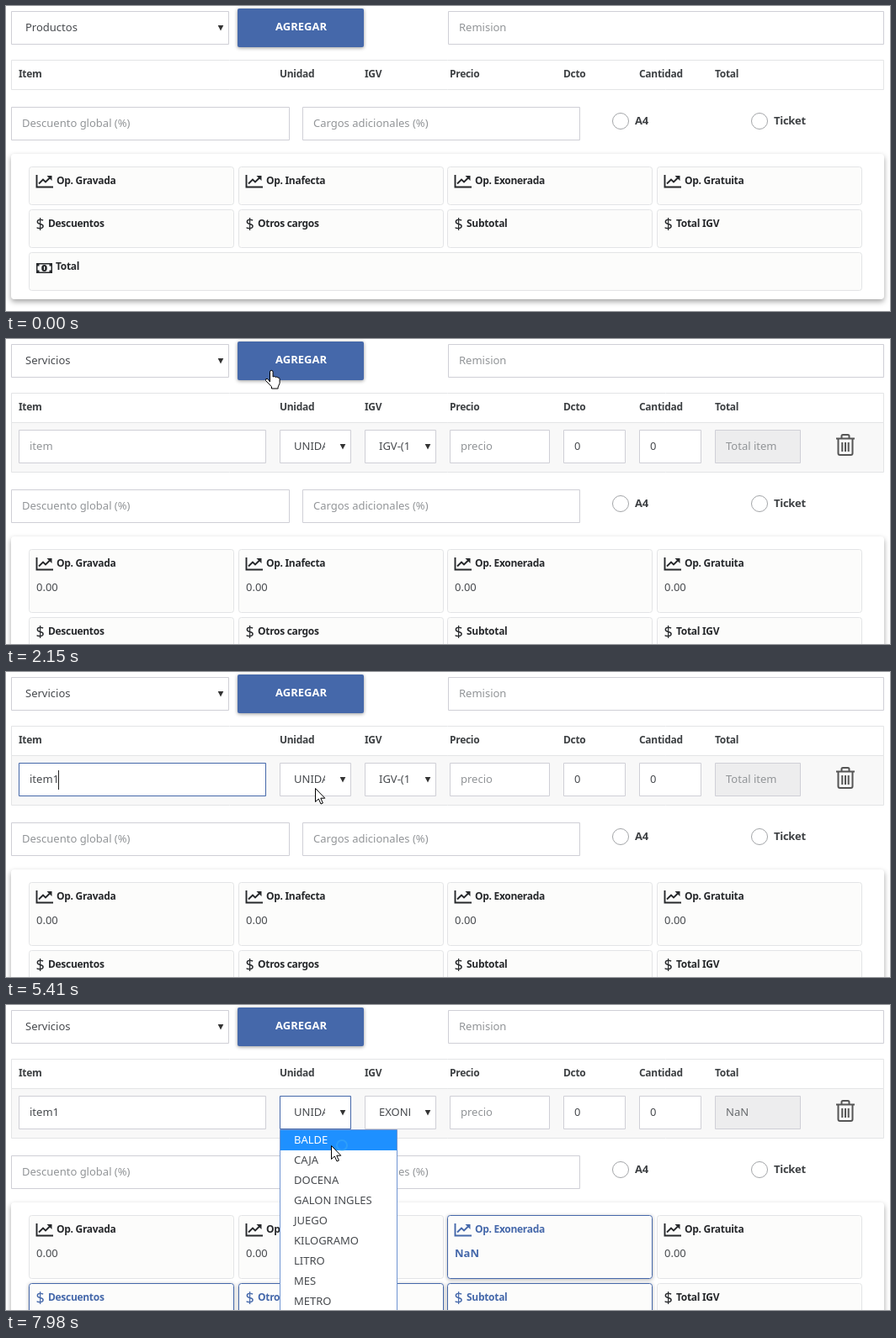
An HTML page with a canvas that plays this animation: 1050 px wide and 363 px high, repeating every 8000 ms.

```html
<!DOCTYPE html>
<html lang="es">
<head>
<meta charset="utf-8">
<style>
  html, body { margin: 0; width: 100%; height: 100%; overflow: hidden; background: #fff; }
  canvas { display: block; }
</style>
</head>
<body>
<canvas id="stage" width="1050" height="363"></canvas>
<script>
const ctx = document.getElementById('stage').getContext('2d');
const LOOP = 8000, STEP = 77;
const BLUE = '#4568aa', DARK = '#26282b', INK = '#474a4e', HINT = '#929598', EDGE = '#cfcfd6', LINE = '#e3e4e6';

// Pointer moves: start time, number of steps, destination
const START = [688, 250];
const MOVES = [
  [150, 5, 127, 22], [850, 5, 108, 84], [1620, 4, 313, 37], [2320, 4, 145, 134],
  [5030, 8, 500, 141], [5800, 1, 498, 136], [6180, 1, 491, 165], [6260, 3, 490, 183],
  [6810, 3, 387, 135], [7040, 2, 384, 126], [7590, 6, 386, 167]
];
// Moment at which each letter is typed
const KEYS = [[3550, 'i'], [3720, 't'], [3870, 'e'], [3950, 'm'], [4330, '1']];

const ARROW = new Path2D('M.5 .5V16.5L4.3 13 7 19 9.4 18 6.8 12.2H11.8Z');
const HAND = new Path2D('M.5 14V2.2a1.8 1.8 0 0 1 3.6 0V8q1.7-1.2 3.2.4 1.6-.8 2.8.7 2-.4 2 1.6v5l-2 4.5V22H2.5v-2.2L-4.5 12.5q-.5-3 2.3-2z');
const BEAM = new Path2D('M-2.5-7.5h6M.5-7.5v16M-2.5 8.5h6');
const TRASH = new Path2D('M986 118.5h22M992.5 118v-2.5q0-1.5 1.5-1.5h6q1.5 0 1.5 1.5v2.5M988.5 119v17q0 2 2 2h13q2 0 2-2v-17M993.3 123v11M997 123v11M1000.7 123v11');
const CHART = new Path2D('M.5 0V14.5H20M3 10.5 8 5.5 11 8.5 16 3.5');
const CHART_TIP = new Path2D('M12.5 1H18.5V7Z');

const between = (t, a, b) => t >= a && t < b;

function text(s, x, y, color = INK, weight = 400, size = 13, spacing = 0) {
  ctx.font = `${weight} ${size}px "Noto Sans", sans-serif`;
  ctx.letterSpacing = spacing + 'px';
  ctx.fillStyle = color;
  ctx.fillText(s, x, y);
}
const label = (s, x, y, color = DARK) => text(s, x, y, color, 600, 12, -0.3);

function box(x, y, w, h, edge = EDGE, fill = '#fff', radius = 0) {
  ctx.beginPath();
  ctx.roundRect(x + .5, y + .5, w - 1, h - 1, radius);
  ctx.fillStyle = fill;
  ctx.fill();
  ctx.strokeStyle = edge;
  ctx.lineWidth = 1;
  ctx.stroke();
}

function raised(x, y, w, h, fill, radius, offset, blur, shade) {
  ctx.save();
  ctx.shadowColor = `rgba(0,0,0,${shade})`;
  ctx.shadowOffsetY = offset;
  ctx.shadowBlur = blur;
  ctx.fillStyle = fill;
  ctx.beginPath();
  ctx.roundRect(x, y, w, h, radius);
  ctx.fill();
  ctx.restore();
}

function field(s, x, y, w, focused, color = HINT) {
  box(x, y, w, 40, focused ? BLUE : EDGE);
  text(s, x + 13, y + 24, color);
}

function select(s, x, y, w, focused) {
  box(x, y, w, 40, focused ? BLUE : EDGE);
  ctx.save();
  ctx.beginPath();
  ctx.rect(x, y, w - 31, 40);
  ctx.clip();
  text(s, x + 17, y + 24);
  ctx.restore();
  const ax = x + w - 10, ay = y + 17;
  ctx.fillStyle = '#333';
  ctx.beginPath();
  ctx.moveTo(ax - 3.3, ay);
  ctx.lineTo(ax + 3.3, ay);
  ctx.lineTo(ax, ay + 6.5);
  ctx.fill();
}

function dropdown(options, x, y, w, active) {
  box(x, y, w, options.length * 24 + 2, '#6f94d2');
  options.forEach((s, i) => {
    const top = y + 1 + i * 24;
    if (i === active) {
      ctx.fillStyle = '#1e90ff';
      ctx.fillRect(x + 1, top, w - 2, 24);
    }
    text(s, x + 17, top + 15.5, i === active ? '#fff' : INK, i === active ? 500 : 400);
  });
}

function radio(s, x, y) {
  ctx.beginPath();
  ctx.arc(x, y, 9.5, 0, 7);
  ctx.strokeStyle = '#a3a5a8';
  ctx.lineWidth = 1;
  ctx.stroke();
  text(s, x + 17, y + 4, '#3d4043', 600, 13, -0.3);
}

function chartIcon(x, y, color) {
  ctx.save();
  ctx.translate(x, y);
  ctx.strokeStyle = ctx.fillStyle = color;
  ctx.lineWidth = 1.9;
  ctx.stroke(CHART);
  ctx.fill(CHART_TIP);
  ctx.restore();
}

function noteIcon(x, y) {
  ctx.fillStyle = DARK;
  ctx.fillRect(x, y, 19, 12);
  ctx.fillStyle = '#fcfcfb';
  ctx.fillRect(x + 3.5, y + 1.5, 12, 9);
  ctx.fillRect(x + 1.5, y + 3.5, 16, 5);
  ctx.fillStyle = DARK;
  ctx.beginPath();
  ctx.ellipse(x + 9.5, y + 6, 3.3, 4, 0, 0, 7);
  ctx.fill();
  ctx.fillStyle = '#fff';
  ctx.fillRect(x + 9, y + 4, 1.2, 4);
}

function card(title, x, y, w, h, value, lit, icon) {
  const color = lit ? BLUE : DARK;
  if (lit) raised(x, y, w, h, '#fff', 3, 1, 4, .3);
  box(x, y, w, h, lit ? BLUE : LINE, '#fcfcfb', 3);
  if (icon === 'chart') {
    chartIcon(x + 9, y + 10, color);
    label(title, x + 33, y + 21, color);
  } else if (icon === 'note') {
    noteIcon(x + 9, y + 13);
    label(title, x + 32, y + 21, color);
  } else {
    text('$', x + 8.5, y + 23.5, color, 500, 18);
    label(title, x + 23, y + 21, color);
  }
  if (value) text(value, x + 9, y + 50, lit ? BLUE : INK, lit ? 600 : 400);
}

function summary(top, values, nan) {
  const h = values ? 76 : 46, gap = h + 5;
  raised(6, top, 1037, 15 + gap * 3 + 5, '#fff', 4, 3, 6, .36);
  const rows = [['Op. Gravada', 'Op. Inafecta', 'Op. Exonerada', 'Op. Gratuita'],
                ['Descuentos', 'Otros cargos', 'Subtotal', 'Total IGV']];
  rows.forEach((titles, r) => titles.forEach((title, c) => {
    const lit = nan && (r ? c < 3 : c === 2);
    card(title, Math.round(27 + c * 248.7), top + 15 + r * gap, 244, h,
         values && (lit ? 'NaN' : '0.00'), lit, r ? 'dollar' : 'chart');
  }));
  card('Total', 27, top + 15 + gap * 2, 990, h, values && '0.00', nan, 'note');
}

function itemRow(t, nan) {
  box(6, 99, 1037, 60, LINE, '#f8f8f8');
  const typed = KEYS.filter(k => t >= k[0]).map(k => k[1]).join('');
  const focused = between(t, 2700, 5950);
  field(typed || 'item', 15, 108, 294, focused, typed ? INK : HINT);
  const caretOn = between(t, 2700, 3250) || between(t, 3550, 4880) || between(t, 5380, 5950);
  if (caretOn) {
    const w = ctx.measureText(typed).width;
    ctx.fillStyle = '#222';
    ctx.fillRect(Math.round(28 + w - (w > 30 ? 1 : 0)), 117, 1, 23);
  }
  select('UNIDAD', 325, 108, 85, t >= 7440);
  select(nan ? 'EXONERADO' : 'IGV-(18%)', 426, 108, 85, between(t, 5950, 7440));
  field('precio', 527, 108, 119);
  field('0', 662, 108, 74, false, INK);
  field('0', 752, 108, 74, false, INK);
  box(842, 108, 102, 40, EDGE, '#ededee');
  text(nan ? 'NaN' : 'Total item', 855, 132, nan ? '#66696c' : HINT);
  ctx.strokeStyle = '#555';
  ctx.lineWidth = 2;
  ctx.stroke(TRASH);
}

function pointerAt(t) {
  let [x, y] = START;
  for (const [start, steps, toX, toY] of MOVES) {
    if (t < start) break;
    const p = Math.min(steps, Math.floor((t - start) / STEP) + 1) / steps;
    x += (toX - x) * p;
    y += (toY - y) * p;
  }
  return [Math.round(x), Math.round(y)];
}

function busyRing(x, y, strong) {
  ctx.save();
  ctx.beginPath();
  ctx.arc(x, y, 6, 0, 7);
  if (strong) {
    ctx.fillStyle = '#fff';
    ctx.fill();
  }
  ctx.globalAlpha = strong ? 1 : .4;
  ctx.strokeStyle = strong ? '#2493ee' : '#45b4f2';
  ctx.lineWidth = strong ? 4 : 2;
  ctx.stroke();
  ctx.restore();
}

function pointer(t, x, y, hasRow) {
  const onButton = between(x, 275, 425) && between(y, 3, 49);
  const onItem = hasRow && between(x, 15, 309) && between(y, 108, 148);
  if (t >= 5800) busyRing(x + 13, y, t < 6180 || between(t, 6730, 7590));
  ctx.save();
  ctx.translate(x, y);
  ctx.fillStyle = '#fff';
  ctx.strokeStyle = '#000';
  ctx.lineWidth = 1;
  const shape = onButton ? HAND : onItem ? BEAM : ARROW;
  if (shape !== BEAM) ctx.fill(shape);
  ctx.stroke(shape);
  ctx.restore();
}

function draw(t) {
  const hasRow = t >= 2080, nan = t >= 6730, shift = hasRow ? 59 : 0;
  const [px, py] = pointerAt(t);

  ctx.fillStyle = '#fff';
  ctx.fillRect(0, 0, 1050, 363);

  select(t < 1460 ? 'Productos' : 'Servicios', 6, 6, 259, between(t, 770, 2000));
  raised(275, 3, 150, 46, between(t, 2000, 2080) ? '#3b5b98' : BLUE, 2, 1, 4, .4);
  ctx.textAlign = 'center';
  text('AGREGAR', 350.5, 29, '#fff', 700);
  ctx.textAlign = 'left';
  field('Remision', 525, 6, 518);

  box(6, 64, 1037, 36, LINE);
  [['Item', 15], ['Unidad', 325], ['IGV', 426], ['Precio', 527], ['Dcto', 662], ['Cantidad', 752], ['Total', 842]]
    .forEach(([s, x]) => label(s, x, 85, '#3d4043'));
  if (hasRow) itemRow(t, nan);

  field('Descuento global (%)', 6, 120 + shift, 331);
  field('Cargos adicionales (%)', 352, 120 + shift, 330);
  radio('A4', 730, 137 + shift);
  radio('Ticket', 895, 137 + shift);
  summary(176 + shift, t >= 1460, nan);

  if (between(t, 770, 1460)) dropdown(['Productos', 'Servicios'], 6, 46, 259, py >= 71 ? 1 : 0);
  if (between(t, 5950, 6730))
    dropdown(['IGV-(18%)', 'EXONERADO', 'INAFECTO', 'GRATUITO'], 426, 148, 99, py >= 173 ? 1 : 0);
  if (t >= 7520)
    dropdown(['BALDE', 'CAJA', 'DOCENA', 'GALON INGLES', 'JUEGO', 'KILOGRAMO', 'LITRO', 'MES', 'METRO'],
             325, 148, 140, py >= 149 ? 0 : -1);

  if (t >= 150) pointer(t, px, py, hasRow);
}

function tick() {
  draw(performance.now() % LOOP);
  requestAnimationFrame(tick);
}
tick();
</script>
</body>
</html>
```
